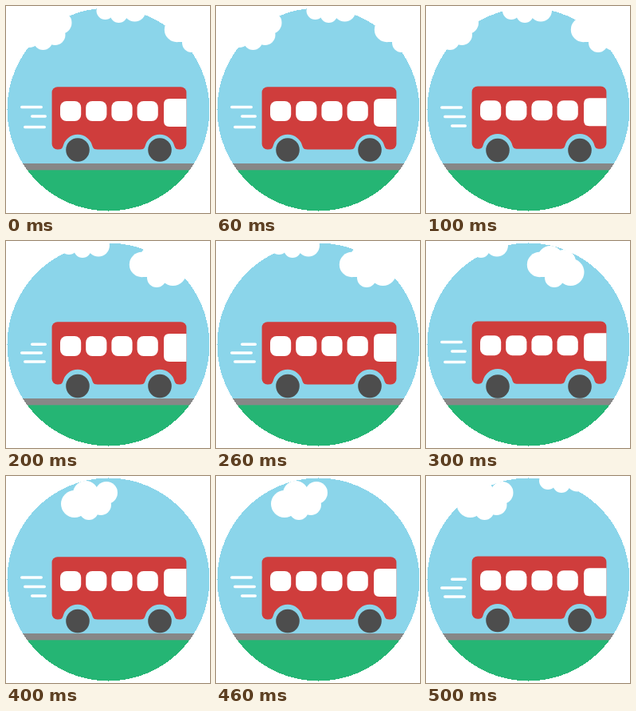
These frames come from a looping animation (256x259 px, 0.6 s). An HTML page:

```html
<!DOCTYPE html>
<html lang="en">
<head>
<meta charset="utf-8">
<title>Bus ride</title>
<style>
  html, body { margin: 0; width: 100%; height: 100%; overflow: hidden; background: #fff; }
  svg { display: block; width: 100%; height: 100%; }
</style>
</head>
<body>
<svg viewBox="0 0 256 259">
  <rect width="256" height="259" fill="#8bd5ea"/>
  <g fill="#fff">
    <g id="wide">
      <circle cx="142.5" cy="29.5" r="15.7"/>
      <circle cx="156" cy="22" r="16"/>
      <circle cx="173" cy="26" r="15"/>
      <circle cx="161" cy="46" r="12"/>
      <circle cx="181.5" cy="39" r="17"/>
      <rect x="142" y="24" width="40" height="21"/>
    </g>
    <g id="tall">
      <circle cx="86" cy="35" r="17"/>
      <circle cx="100" cy="22" r="16"/>
      <circle cx="126" cy="21" r="14"/>
      <circle cx="104" cy="43" r="12"/>
      <circle cx="119" cy="36" r="13"/>
      <rect x="88" y="20" width="34" height="25"/>
    </g>
    <g id="high">
      <circle cx="107" cy="6" r="11"/>
      <circle cx="124" cy="10" r="11"/>
      <circle cx="144" cy="5.5" r="14"/>
      <rect x="108" y="0" width="36" height="12"/>
    </g>
  </g>
  <g id="lines" stroke="#fff" stroke-width="3.4" stroke-linecap="round">
    <line/><line/><line/>
  </g>
  <g id="bus">
    <rect x="57.6" y="101.3" width="168.8" height="78.2" rx="7" fill="#cf3d3c"/>
    <g id="panes" fill="#fff"></g>
    <path d="M226.4 116H205Q198 116 198 123V144Q198 151 205 151H226.4Z" fill="#fff"/>
    <g id="arches" fill="#8bd5ea"></g>
  </g>
  <rect y="205" width="256" height="54" fill="#25b574"/>
  <rect y="197" width="256" height="8.3" fill="#878787"/>
  <g id="wheels" fill="#4d4d4d"><circle cx="90" r="14.8"/><circle cx="193" r="14.8"/></g>
  <path d="M0 0H256V259H0ZM1.5 129.5a127 127 0 0 0 254 0a127 127 0 0 0 -254 0Z"
        fill="#fff" fill-rule="evenodd" shape-rendering="crispEdges"/>
</svg>
<script>
  const $ = id => document.getElementById(id);
  const STEP = 100, COUNT = 6;

  $('panes').innerHTML = [68, 100.2, 132.4, 164.6]
    .map(x => `<rect x="${x}" y="119" width="26.2" height="25" rx="8"/>`).join('');
  $('arches').innerHTML = [90, 193]
    .map(x => `<path d="M${x - 25} 180Q${x - 19.5} 179.5 ${x - 18.5} 175.5
      A19 19 0 0 1 ${x + 18.5} 175.5Q${x + 19.5} 179.5 ${x + 25} 180Z"/>`).join('');

  // Horizontal cloud shift per step; null hides the cloud.
  const drift = {
    wide: [72, 55, 28, 0, null, null],
    tall: [-57.5, -74, null, null, 0, -30.5],
    high: [17.5, 0, -28, -55, null, 46]
  };

  // Speed lines: [left, right, y]
  const streaks = [
    [[18, 46, 126.5], [31, 51, 138], [22, 50, 151.5]],
    [[18, 46, 127], [22, 50, 138.5], [31, 51, 150]],
    [[31, 51, 129.3], [18, 46, 140], [22, 50, 151]]
  ];

  const move = (id, x, y) => $(id).setAttribute('transform', `translate(${x} ${y})`);

  function draw(step) {
    for (const id in drift) {
      const x = drift[id][step];
      $(id).style.display = x === null ? 'none' : '';
      if (x !== null) move(id, x, 0);
    }
    [...$('lines').children].forEach((line, i) => {
      const [left, right, y] = streaks[step % 3][i];
      line.setAttribute('x1', left + 1.7);
      line.setAttribute('x2', right - 1.7);
      line.setAttribute('y1', y);
      line.setAttribute('y2', y);
    });
    move('bus', 0, step % 2 ? -0.8 : 0);
    move('wheels', 0, 181 - Math.cos(step / COUNT * 2 * Math.PI));
  }

  const start = performance.now();
  let last = 0;
  function tick() {
    const step = Math.floor((performance.now() - start) / STEP) % COUNT;
    if (step !== last) draw(last = step);
    requestAnimationFrame(tick);
  }
  draw(0);
  requestAnimationFrame(tick);
</script>
</body>
</html>
```
